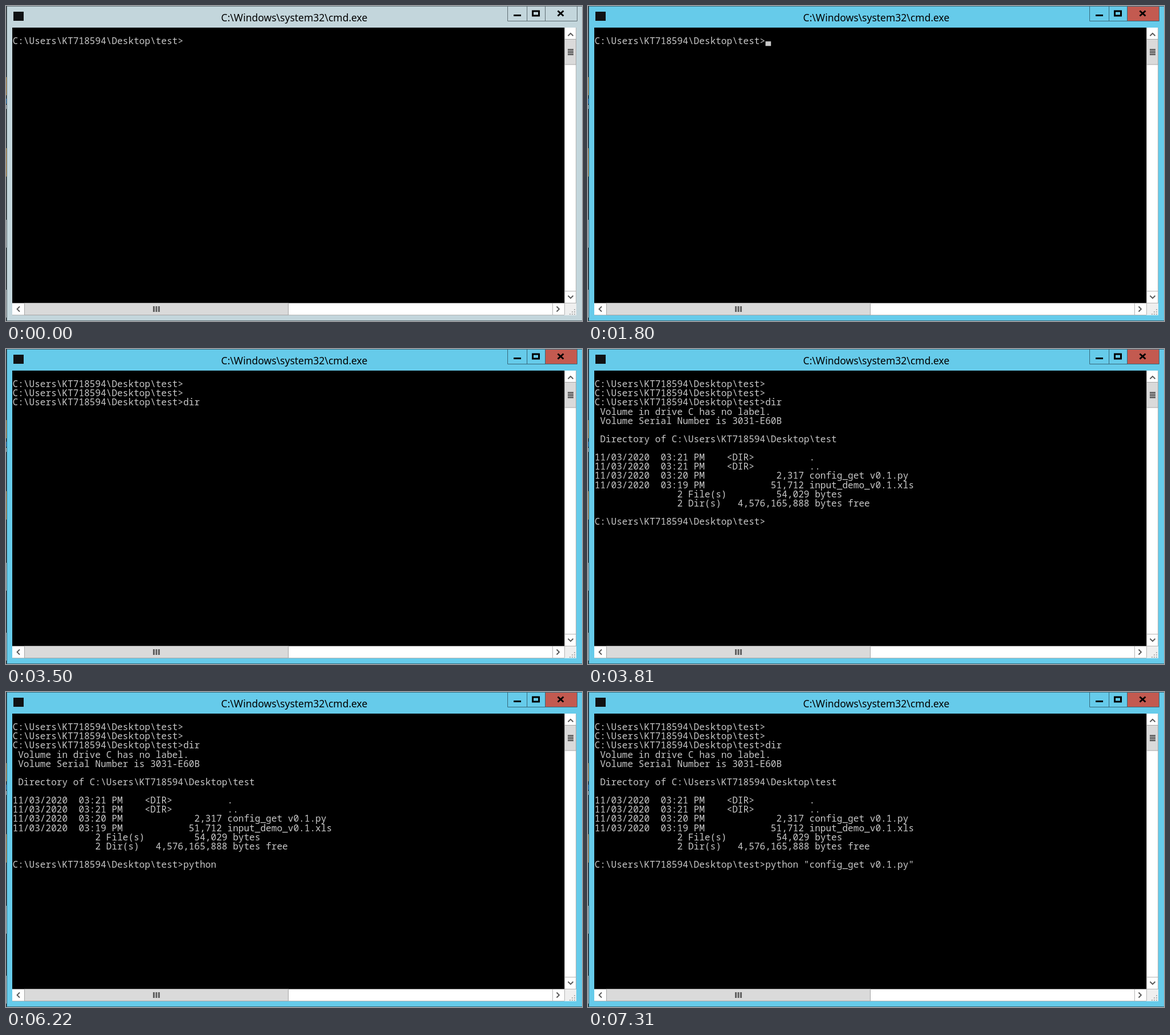
These frames come from a looping animation (1011x554 px, 8000 ms). An HTML page:

```html
<!DOCTYPE html>
<html lang="en">
<head>
<meta charset="utf-8">
<title>Command prompt</title>
<style>
  html, body { margin: 0; width: 100%; height: 100%; overflow: hidden; }
  svg { display: block; width: 1011px; height: 554px; --frame: #c3d6dc; --close: #c3d6dc; --edge: #5f6e74; }
  svg.active { --frame: #66cbea; --close: #c35a50; --edge: #37687a; }
  .frame { fill: var(--frame); }
  .edge { fill: none; stroke: var(--edge); }
  .title { font: 17.5px "Noto Sans", sans-serif; text-anchor: middle; }
  .row { font: 16.13px "Noto Sans Mono", monospace; fill: #c8c8c8; white-space: pre; }
  .thumb { fill: #dadada; stroke: #a6a6a6; }
  .line { fill: none; stroke: #b4b4b4; }
  .arrow { fill: none; stroke: #555; stroke-width: 1.8; }
  .grip { fill: none; stroke: #606060; stroke-width: 3; }
</style>
</head>
<body>
<svg id="stage" viewBox="0 0 1011 554">
  <!-- sliver of the desktop behind the window -->
  <rect width="1011" height="554" fill="#23282b"/>
  <path d="M.5 125v32M.5 250v50" stroke="#c8944c"/>
  <path d="M.5 163v9" stroke="#2878c0"/>
  <path d="M.5 174v7M.5 376v49M.5 499v49" stroke="#b8bcbe"/>

  <rect class="frame" x="1" y="1" width="1010" height="552"/>
  <path class="edge" d="M1.5 554V.5H1011M1 553.5H1011"/>
  <rect x="13" y="10" width="18" height="16" fill="#101214"/>
  <text class="title" x="506" y="26.5">C:\Windows\system32\cmd.exe</text>

  <rect x="946" y="1" width="56" height="25" fill="var(--close)"/>
  <path class="edge" d="M880.5 0V26.5H1002.5V0M914.5 0V26M946.5 0V26"/>
  <path d="M891 16.5h13" stroke="#000" stroke-width="3"/>
  <rect x="924.5" y="9" width="11" height="8" fill="none" stroke="#000" stroke-width="3"/>
  <path d="M968.5 8.5l10 9m0-9l-10 9" stroke="#000" stroke-width="3"/>

  <rect x="11" y="38" width="990" height="505.500" fill="#fff"/>
  <rect x="11" y="38" width="969.500" height="484.500"/>
  <path class="line" d="M980.5 38V543M1000.5 38V522M981 501.500h20M981 522.500h20M11 543.500H980M959.500 523v20"/>
  <rect class="thumb" x="980.500" y="58.500" width="20" height="44.500"/>
  <rect class="thumb" x="32.500" y="522.500" width="463" height="21"/>
  <path class="arrow" d="M986.500 52.500l4.500-4.500 4.500 4.500M986.500 509.500l4.500 4.500 4.500-4.500M24 528.500l-4.500 4.500 4.500 4.500M966.500 528.500l4.500 4.500-4.500 4.500"/>
  <path class="grip" d="M986 77h10M986 81h10M986 85h10M259.500 528v10M264 528v10M268.500 528v10"/>
  <rect x="981" y="523" width="20" height="20.500" fill="#efefef"/>
  <path d="M998 533v10M994 537v6M990 541v2" stroke="#b0b0b0" stroke-width="2" stroke-dasharray="2"/>

  <g id="screen"></g>
  <rect id="cursor" width="9.680" height="8.100" fill="#c8c8c8"/>
</svg>
<script>
const LOOP = 8000, LEFT = 11.5, TOP = 38, CHAR = 9.678, LINE = 16.13;
const dir = String.raw`C:\Users\KT718594\Desktop\test`;
const prompt = dir + '>';
const listing = ` Volume in drive C has no label.
 Volume Serial Number is 3031-E60B

 Directory of ${dir}

11/03/2020  03:21 PM    <DIR>          .
11/03/2020  03:21 PM    <DIR>          ..
11/03/2020  03:20 PM             2,317 config_get v0.1.py
11/03/2020  03:19 PM            51,712 input_demo_v0.1.xls
               2 File(s)         54,029 bytes
               2 Dir(s)   4,576,165,888 bytes free
`.split('\n');

// Output already on screen at each stage of the session
const start = [''];
const entered = ['', prompt, prompt];
const listed = [...entered, prompt + 'dir', ...listing];
listed.splice(2, 1);

// Time, output above, typed command, cursor visible
const steps = [
  [0, start, '', false],
  [1800, start, '', true],
  [2800, entered, '', false],
  [3360, entered, 'd', false],
  [3430, entered, 'di', true],
  [3500, entered, 'dir', false],
  [3810, listed, '', false],
  [4490, listed, '', true],
  [5270, listed, 'p', false],
  [5520, listed, 'p', true],
  [5580, listed, 'py', false],
  [5820, listed, 'pyt', false],
  [5900, listed, 'pyth', false],
  [5980, listed, 'pytho', false],
  [6060, listed, 'python', true],
  [6220, listed, 'python ', false],
  [6590, listed, 'python ', true],
  [6990, listed, 'python c', false],
  [7160, listed, 'python co', false],
  [7240, listed, 'python con', false],
  [7310, listed, 'python "config_get v0.1.py"', false]
];
// The two empty prompts stay above the one that receives "dir"
listed.splice(2, 0, prompt);

const [stage, screen, cursor] = ['stage', 'screen', 'cursor'].map(id => document.getElementById(id));
const rows = Array.from({ length: 17 }, (_, i) => {
  const row = document.createElementNS('http://www.w3.org/2000/svg', 'text');
  row.setAttribute('class', 'row');
  row.setAttribute('x', LEFT);
  row.setAttribute('y', TOP + LINE * i + 13);
  return screen.appendChild(row);
});

let shown;
function draw() {
  const t = performance.now() % LOOP;
  stage.classList.toggle('active', t >= 1320);
  const step = steps.findLast(s => s[0] <= t);
  if (step !== shown) {
    shown = step;
    const [, output, typed, cursorOn] = step;
    const lines = [...output, prompt + typed];
    rows.forEach((row, i) => { row.textContent = lines[i] || ''; });
    cursor.setAttribute('x', LEFT + CHAR * (prompt + typed).length);
    cursor.setAttribute('y', TOP + LINE * (lines.length - 0.5));
    cursor.setAttribute('visibility', cursorOn ? 'visible' : 'hidden');
  }
  requestAnimationFrame(draw);
}
draw();
</script>
</body>
</html>
```
